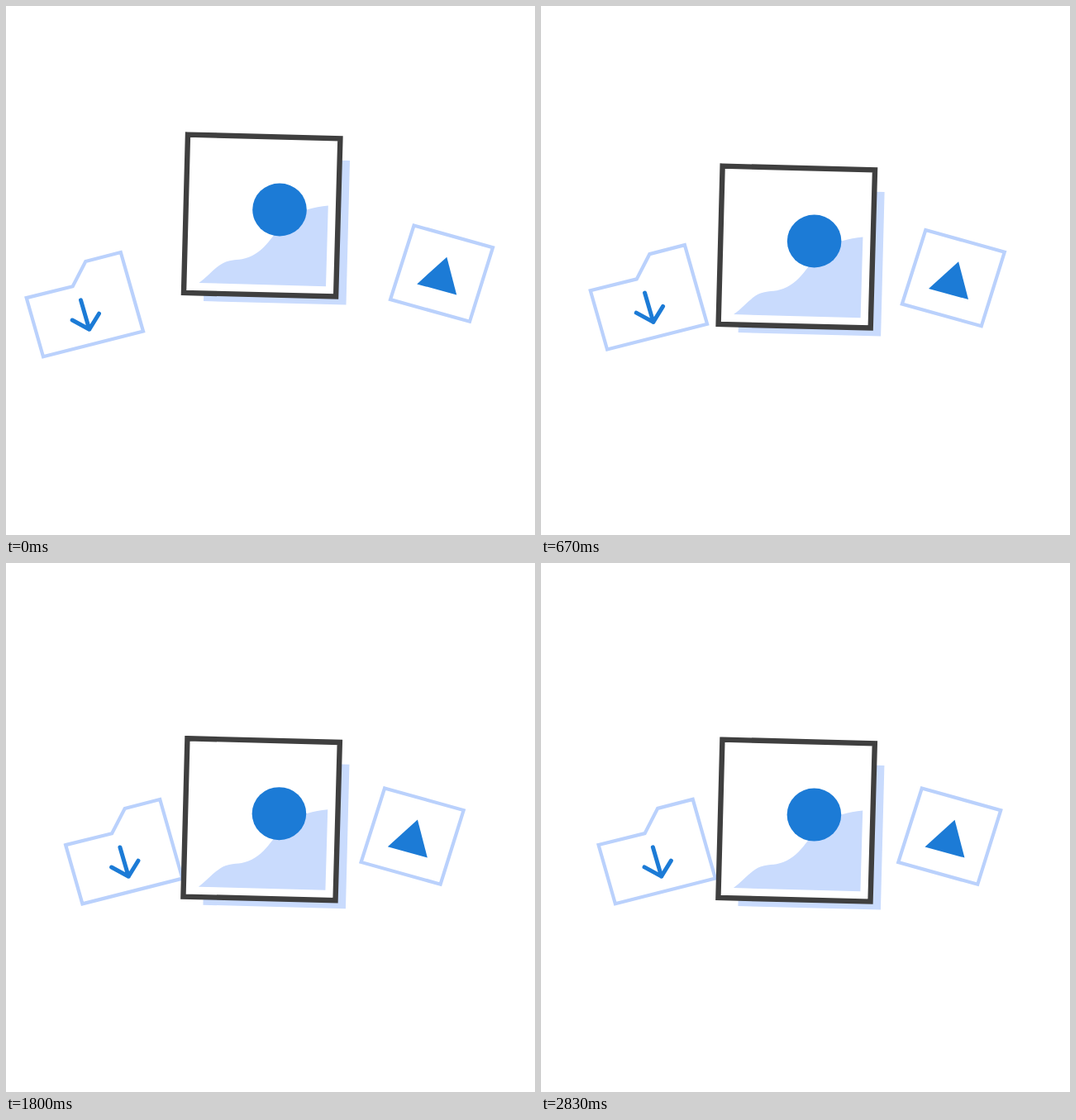
Animation, 640 px wide and 640 px high, one loop 3.61 s. Source, as an HTML page:

```html
<!DOCTYPE html>
<html lang="en">
<head>
<meta charset="utf-8">
<title>Floating pictures</title>
<style>
  html, body { margin: 0; width: 100%; height: 100%; overflow: hidden; background: #fff; }
  svg { display: block; width: 100%; height: 100%; }
  .card { fill: #fff; stroke: #bad1fc; stroke-width: 4.2; }
  .pale { fill: #c9dbfd; }
  .blue { fill: #1c7bd6; }
  .arrow { fill: none; stroke: #1c7bd6; stroke-width: 5; stroke-linecap: round; stroke-linejoin: round; }
  .frame { fill: #fff; stroke: #3f3f3f; stroke-width: 6.4; }
</style>
</head>
<body>
<svg viewBox="0 0 640 640">
  <g id="folder">
    <path class="card" d="M24.7 353.1 80.7 339.2 96.3 309 138.8 298 166 393.6 45 424.3Z"/>
    <path class="arrow" d="M90.5 355.9 100.8 391.2M80.2 380 100.8 391.2 112.5 372.2"/>
  </g>
  <g id="tile">
    <path class="card" d="M493.5 265.5 589 292.2 561 381.8 465 355Z"/>
    <path class="blue" d="M533.3 303.7 545.2 349.6 497.2 336.4Z"/>
  </g>
  <g id="picture">
    <path class="pale" d="M243.5 182.5 416 187 411.5 361.5 239 357Z"/>
    <path class="frame" d="M220 155.6 404.4 160.3 399.1 351.5 215 346.9Z"/>
    <path class="pale" d="M233.5 335C245 327 254 314 266 309.5C279 305.5 285 308.5 298 302C320 291 328 265 345 255C358 247 372 243.5 389.8 241.5L387 339.2Z"/>
    <ellipse class="blue" cx="331" cy="246.5" rx="32.8" ry="32"/>
  </g>
</svg>
<script>
const LOOP = 3610, DELAY = 30, RETURN = 2170, STOP = 2830;
const [folder, tile, picture] = document.querySelectorAll("g");

const move = (part, x, y) => part.setAttribute("transform", `translate(${x} ${y})`);

function smooth(from, to, t) {
  const u = Math.min(1, Math.max(0, (t - from) / (to - from)));
  return u * u * (3 - 2 * u);
}

const start = performance.now();
function draw(now) {
  const t = Math.max(0, now - start) % LOOP;
  const s = Math.max(0, Math.min(t, STOP) - DELAY) / 1000;

  // All parts glide together; the side cards then spread slightly apart.
  const spread = 3.1 * smooth(RETURN, STOP, t);
  const slide = Math.tanh(1.45 * s);
  const settle = 1 - Math.exp(-2.4 * s);
  const drop = 58.2 * Math.tanh(1.22 * s);

  move(folder, 48 * slide - spread, -12.1 * slide);
  move(tile, spread - 35.9 * settle, 7 * settle);
  move(picture, -0.01 * drop, drop);
  requestAnimationFrame(draw);
}
draw(start);
</script>
</body>
</html>
```
